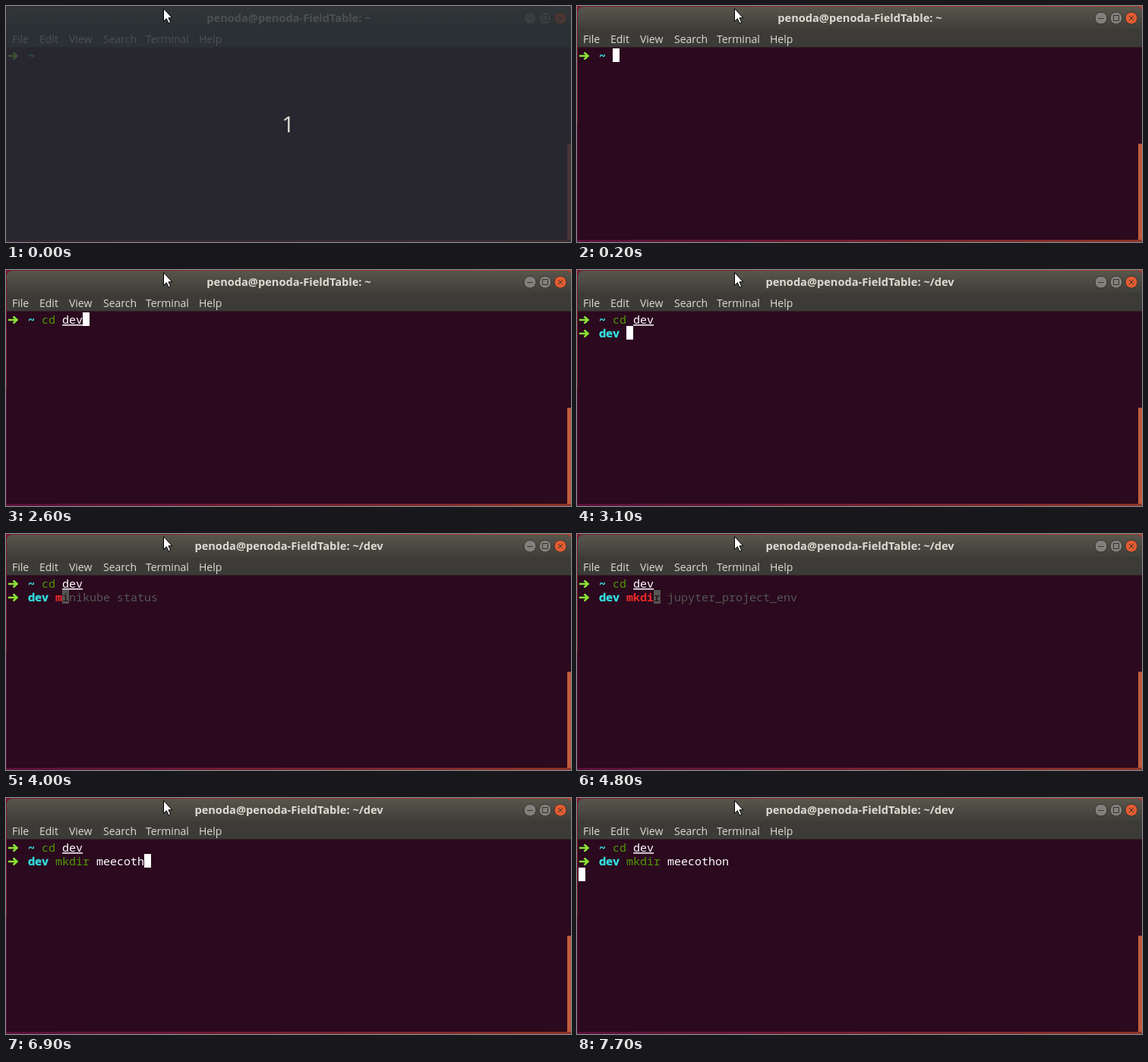
An HTML page that plays this animation: 744x312 px, repeating every 8000 ms.

```html
<!DOCTYPE html>
<html lang="en">
<head>
<meta charset="utf-8">
<title>Terminal session</title>
<style>
  html, body { margin: 0; width: 744px; height: 312px; overflow: hidden; }
  svg { display: block; }
  text { white-space: pre; }
  .ui { font: 14px "Open Sans", "Noto Sans", sans-serif; fill: #dfdbd2; }
  .title { font-weight: 700; font-size: 14.6px; text-anchor: middle; }
  .term { font: 15px "Noto Sans Mono", "DejaVu Sans Mono", monospace; fill: #fff; }
  .dir { fill: #34e2e2; stroke: #34e2e2; stroke-width: .3; font-weight: 700; }
  .ok { fill: #4e9a06; }
  .bad { fill: #ef2929; font-weight: 700; }
  .hint { fill: #555753; }
  .under { fill: #2b091e; }
  .path { text-decoration: underline; }
  .arrow { fill: none; stroke: #8ae234; stroke-width: 2.5; }
</style>
</head>
<body>
<svg width="744" height="312" viewBox="0 0 744 312">
  <defs>
    <linearGradient id="bar" x2="0" y2="1">
      <stop stop-color="#58564c"/><stop offset="1" stop-color="#3e3d38"/>
    </linearGradient>
    <linearGradient id="deskTop">
      <stop stop-color="#7a1c2c"/><stop offset="1" stop-color="#b0402c"/>
    </linearGradient>
    <linearGradient id="deskBottom">
      <stop stop-color="#5a0f3a"/><stop offset="1" stop-color="#8f3428"/>
    </linearGradient>
  </defs>
  <rect width="744" height="156" fill="url(#deskTop)"/>
  <rect y="156" width="744" height="156" fill="url(#deskBottom)"/>
  <path d="M1 309V9q0-8 8-8H736q8 0 8 8V309z" fill="#2b091e"/>
  <path d="M1 54.5V9q0-8 8-8H736q8 0 8 8V54.5z" fill="#3c3b37"/>
  <path d="M1 31V9q0-8 8-8H736q8 0 8 8V31z" fill="url(#bar)"/>
  <rect x="739" y="182" width="5" height="127" fill="#bf5b3e"/>
  <g stroke="#33322d">
    <circle cx="690" cy="16" r="8" fill="#82807a"/>
    <circle cx="710" cy="16" r="8" fill="#82807a"/>
    <circle cx="730" cy="16" r="8" fill="#e25c31"/>
    <path d="M686.5 16.5h7M706.5 12.5h7v7h-7zM727 13l6 6M733 13l-6 6" fill="none"/>
  </g>
  <text id="title" class="ui title" x="372.5" y="21"></text>
  <g class="ui">
    <text x="8" y="49">File</text><text x="44" y="49">Edit</text><text x="83" y="49">View</text>
    <text x="128" y="49">Search</text><text x="184" y="49">Terminal</text><text x="254" y="49">Help</text>
  </g>
  <path class="arrow" d="M3 66h11M9.5 61.5l5 4.5-5 4.5"/>
  <path class="arrow" id="arrow2" d="M3 84h11M9.5 79.5l5 4.5-5 4.5"/>
  <rect id="cursor" width="9" height="18"/>
  <text id="line0" class="term" x="29" y="71"></text>
  <text id="line1" class="term" x="29" y="89"></text>
  <g id="veil">
    <rect width="744" height="312" fill="#272d34" opacity=".8"/>
    <text x="371.5" y="167" class="ui" style="font-size:30px;text-anchor:middle">1</text>
  </g>
  <path d="M207.5 3.5V20.3l3.8-3.6 2.7 6 2.6-1.2-2.6-5.8h4.8z" fill="#fff" stroke="#000"/>
</svg>
<script>
const $ = id => document.getElementById(id);
const LOOP = 8000, CELL = 9, ROW = 18, TOP = 56, LEFT = 2;
const CD_DONE = 3000, PROMPT_BACK = 3100, MKDIR_DONE = 7700;

// [time, typed text, suggested rest]
const CD = [
  [0, "", ""], [1000, "c", "lear"], [1200, "cd", " .."], [1300, "cd ", ".."],
  [1500, "cd d", "ev"], [1900, "cd de", "v"], [2000, "cd dev", ""]
];
const JOB = " jupyter_project_env";
const MKDIR = [
  [3100, "", ""], [4000, "m", "inikube status"], [4400, "mk", "dir" + JOB], [4500, "mkd", "ir" + JOB],
  [4800, "mkdi", "r" + JOB], [4900, "mkdir", JOB], [5100, "mkdir ", JOB.slice(1)],
  ...[5300, 5400, 5800, 6000, 6400, 6500, 6900, 7000, 7600]
    .map((time, i) => [time, "mkdir " + "meecothon".slice(0, i + 1), ""])
];

const at = (steps, t) => steps.findLast(s => s[0] <= t);
const span = (cls, s) => s && `<tspan class="${cls}">${s}</tspan>`;

function lineMarkup(dir, typed, hint) {
  const [word, ...args] = typed.split(" ");
  const known = word === "cd" || word === "mkdir";
  const rest = args.join(" ");
  return span("dir", dir) + " " + span(known ? "ok" : "bad", word) +
    (args.length ? " " : "") + span(word === "cd" ? "path" : "arg", rest) +
    span("under", hint.slice(0, 1)) + span("hint", hint.slice(1));
}

function placeCursor(col, row, grey) {
  $("cursor").setAttribute("x", LEFT + col * CELL);
  $("cursor").setAttribute("y", TOP + row * ROW);
  $("cursor").setAttribute("fill", grey ? "#555753" : "#fff");
}

function draw(t) {
  const back = t >= PROMPT_BACK;
  const [, typed, hint] = at(back ? MKDIR : CD, t);
  $("veil").style.display = t < 200 ? "" : "none";
  $("title").textContent = "penoda@penoda-FieldTable: ~" + (back ? "/dev" : "");
  $("line0").innerHTML = back ? lineMarkup("~", "cd dev", "") : lineMarkup("~", typed, hint);
  $("line1").innerHTML = back ? lineMarkup("dev", typed, hint) : "";
  $("arrow2").style.display = back ? "" : "none";

  const blinkOff = t >= 2500 && t < 2600;
  $("cursor").style.display = t < 200 || blinkOff ? "none" : "";
  if (t >= MKDIR_DONE) placeCursor(0, 2);
  else if (back) placeCursor(7 + typed.length, 1, hint);
  else if (t >= CD_DONE) placeCursor(0, 1);
  else placeCursor(5 + typed.length, 0, hint);
}

const start = performance.now();
function tick() {
  draw((performance.now() - start) % LOOP);
  requestAnimationFrame(tick);
}
tick();
</script>
</body>
</html>
```
